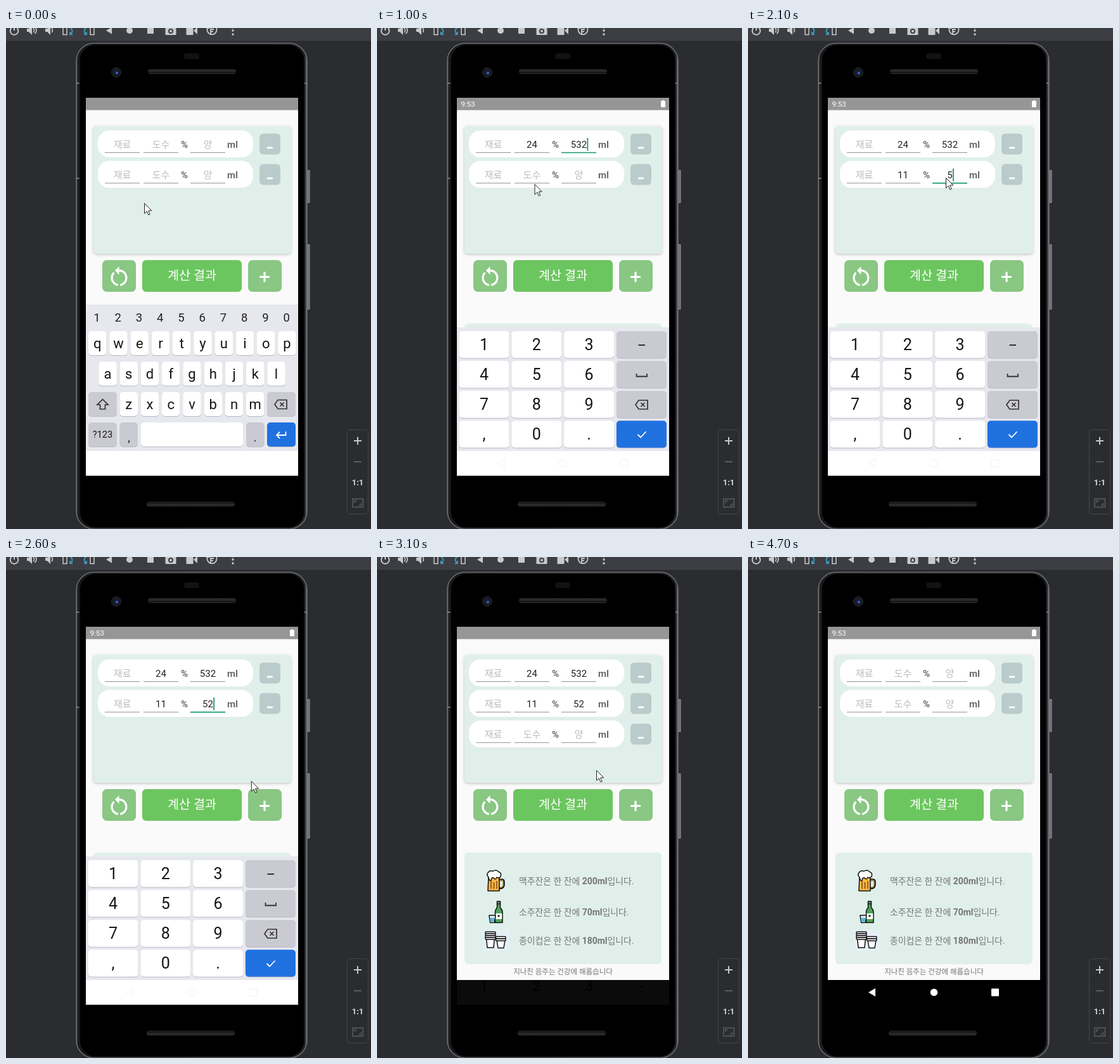
Animation, 576 px wide and 790 px high, one loop 4.8 s. Source, as an HTML page:

```html
<!DOCTYPE html>
<html lang="ko">
<head>
<meta charset="utf-8">
<title>Cocktail calculator</title>
<style>
html, body { margin: 0; width: 100%; height: 100%; overflow: hidden; background: #2b2c30; }
svg { display: block; width: 576px; height: 790px; }
text { font-family: Roboto, "Noto Sans CJK KR", "Noto Sans CJK", sans-serif; text-anchor: middle; }
</style>
</head>
<body>
<svg id="stage" viewBox="0 0 576 790">
  <defs>
    <linearGradient id="edge">
      <stop offset="0" stop-color="#55575a"/><stop offset=".008" stop-color="#17181a"/>
      <stop offset=".992" stop-color="#242527"/><stop offset="1" stop-color="#8a8c8e"/>
    </linearGradient>
    <pattern id="mesh" width="4" height="7" patternUnits="userSpaceOnUse">
      <path d="M0 1L2 3.5L0 6M2 1L4 3.5L2 6" fill="none" stroke="#4a4a4a" stroke-width=".8"/>
    </pattern>
    <filter id="soft" x="-10%" y="-10%" width="120%" height="125%">
      <feDropShadow dx="0" dy="1.5" stdDeviation="2" flood-opacity=".25"/>
    </filter>
  </defs>
  <g id="device"></g>
  <g id="app"></g>
  <g id="rows"></g>
  <g id="system"></g>
  <path id="pointer" d="M.5 .5V16.5L4.3 13L6.8 18.8L9.2 17.8L6.7 12H11.8Z" fill="#fff" stroke="#222" stroke-width="1"/>
</svg>
<script>
const LOOP = 4800, STEP = 100;
const GREEN = '#16996b', MINT = '#e0efea', INK = '#757575', BLUE = '#2071e0', GREY_KEY = '#cacad3';
const byId = id => document.getElementById(id);

const rect = (x, y, w, h, r, fill, extra = '') =>
  `<rect x="${x}" y="${y}" width="${w}" height="${h}" rx="${r}" fill="${fill}" ${extra}/>`;
const circle = (x, y, r, fill, extra = '') =>
  `<circle cx="${x}" cy="${y}" r="${r}" fill="${fill}" ${extra}/>`;
const fillPath = (d, fill, extra = '') => `<path d="${d}" fill="${fill}" ${extra}/>`;
const line = (d, color, width, extra = '') =>
  `<path d="${d}" fill="none" stroke="${color}" stroke-width="${width}" ${extra}/>`;
// y is the visual middle of the text
const label = (s, x, y, size, fill, extra = '') =>
  `<text x="${x}" y="${y + size * .355}" font-size="${size}" fill="${fill}" ${extra}>${s}</text>`;
const bold = 'font-weight="700"';
const left = 'style="text-anchor:start"';

function toolbar() {
  const c = '#c9cacd', b = '#3d9bc0';
  const speaker = x => fillPath(`M${x} 1h3l5-5v15l-5-5h-3z`, c);
  return rect(0, 0, 576, 21, 0, '#3d3e43') + rect(0, 20.5, 576, 1, 0, '#25262a') +
    line('M8.5 0A6.3 6.3 0 1 0 17.500 0M13 -3V4', c, 2) +
    speaker(33) + line('M43 0q3 4 0 7M45.500 -2q5 6 0 11', c, 1.6) +
    speaker(62) + line('M72 0q3 4 0 7', c, 1.6) +
    line('M90 -2V10.500H96V-2', c, 1.5) + line('M101 -1q5 4 3 8l-3 3M101 6v4h4', b, 1.8) +
    line('M133 -2V10.500H139V-2', c, 1.5) + line('M127 -1q-5 4 -3 8l3 3M127 6v4h-4', b, 1.8) +
    fillPath('M158 4L167-1V9.500Z', c) + circle(195, 4, 5, c) + rect(223, -1, 10, 10, 0, c) +
    rect(251.5, -2, 17, 13, 1, c) + circle(260, 5, 4, '#3d3e43') + circle(260, 5, 2, c) +
    rect(284.5, -2, 11, 13, 1, c) + fillPath('M296 4L302-1V10Z', c) +
    line('M318 0A7.500 7.500 0 1 0 332 0M316 0h5v-4M323 9V2h5M323 5.500h4', c, 1.8) +
    circle(358, 4, 1.7, c) + circle(358, 10, 1.7, c) + circle(358, -1, 1.7, c);
}

function zoomPanel() {
  return rect(538.5, 633.5, 33, 133, 4, '#2b2c30', 'stroke="#44454a"') +
    line('M549 651H561M555 645V657', '#c6c7ca', 2) + line('M549 684H561', '#606166', 1.8) +
    label('1:1', 555, 716, 13, '#d0d1d4', bold) +
    line('M547 742.500H563.500V755.500H547Z', '#5d5e63', 1.4) +
    line('M550 749V745.500H553.500M557 752.500H560.500V749', '#5d5e63', 1.3);
}

function phone() {
  const grille = (x, y) => rect(x, y, 139, 7.5, 3.5, '#151515') + rect(x, y, 139, 7.5, 3.5, 'url(#mesh)');
  const sideKey = (y, h) => rect(475.5, y, 4, h, 1, '#8b8d8f') + rect(477, y + 1, 1, h - 2, 0, '#55575a');
  return sideKey(224, 52) + sideKey(341, 103) +
    rect(111, 24, 364, 766, 28, 'url(#edge)', 'stroke="#6c6e70" stroke-width="1.5"') +
    rect(116, 26, 355, 762, 25, '#000', 'stroke="#1c1d1f" stroke-width="1.5"') +
    line('M110.500 87H115.500M110.500 237H115.500M471 87H475.500', '#77797b', 2) +
    rect(281, 40, 24, 9, 4, '#121212') + grille(224, 65) + grille(222, 747) +
    circle(174, 70, 7.5, '#18191c', 'stroke="#26272a"') + circle(174, 70, 4, '#142049') +
    circle(175, 71, 1.8, '#4f71b5');
}

function drinks() {
  const o = 'stroke="#111" stroke-width="1.5" stroke-linejoin="round"';
  const beer = line('M192 509H197Q200 509 200 512V517Q200 521 196 522H192', '#111', 3.4) +
    line('M192 509.500H197Q199 510 199 512V517Q199 520 196 521H192', '#f6ce76', 1.1) +
    fillPath('M176 504H193V526.500H175Z', '#f4b443', o) +
    line('M180 511V523M184.500 513V523M189 511V523', '#874f17', 1.6) +
    fillPath('M176 505Q172 501 175 498Q178 493 183 495.500Q188 492 192 496.500Q197 498 195 504Q192 507 189 505Q187 510 184 506Q181 504 180 510Q177 511 176 505Z', '#fff', o);
  const bottle = fillPath('M189.500 543H194.500V553Q198 556 198 560V576.500H186.500V560Q186.500 556 189.500 553Z', '#4fa35b', o) +
    line('M189 547H195', '#111', 1.2) + rect(187.2, 562, 10, 9, 0, '#fff') + circle(192, 566, 1.8, '#333') +
    fillPath('M177 565H187L185.500 576.500H178.500Z', '#d9f2fa', o) + rect(178.5, 569, 6.5, 6, 0, '#55b8dc');
  const cups = rect(168, 588, 41, 33, 0, '#e4f0f6') +
    fillPath('M172.500 600H185.500L184 616H174Z', '#fff', o) + fillPath('M189 604H202L200 616.500H191Z', '#fff', o) +
    [591, 594, 597, 600].map(y => rect(171, y, 16, 3, 1, '#fff', o)).join('') +
    [598.5, 602].map(y => rect(187.5, y, 15.5, 3.2, 1, '#fff', o)).join('');
  return beer + bottle + cups;
}

function app() {
  const fact = (name, ml, y) =>
    label(`${name} 한 잔에 <tspan ${bold}>${ml}ml</tspan>입니다.`, 224, y, 13.9, INK, left);
  const restart = 'M12 5V2L8 6l4 4V7c3.31 0 6 2.69 6 6 0 2.97-2.17 5.43-5 5.91v2.02c3.95-.49 7-3.85 7-7.93 0-4.42-3.58-8-8-8zm-6 8c0-1.65.67-3.15 1.76-4.24L6.34 7.34C4.9 8.79 4 10.79 4 13c0 4.08 3.05 7.44 7 7.93v-2.02c-2.83-.48-5-2.94-5-5.91z';
  return rect(126, 110, 335, 557, 0, '#fafafa') + rect(126, 110, 335, 19.5, 0, '#969696') +
    rect(138, 154.5, 311.5, 201, 5, MINT, 'filter="url(#soft)"') +
    rect(152, 366, 53, 50, 7, '#89c783') + rect(215, 366, 157, 50, 6, '#6cc65f') + rect(382, 366, 53, 50, 7, '#89c783') +
    fillPath(restart, '#fff', 'transform="translate(158.900 372.700) scale(1.63)"') +
    label('계산 결과', 293.5, 390.5, 19.6, '#fff') +
    line('M400 392.500H416M408 384.500V400.500', '#fff', 3.2) +
    rect(138, 466, 311, 176, 6, MINT) + drinks() +
    fact('맥주잔은', 200, 511) + fact('소주잔은', 70, 560) + fact('종이컵은', 180, 605) +
    label('지나친 음주는 건강에 해롭습니다', 293.5, 654, 11.5, INK);
}

function field(x, y, hint, value, focused) {
  const caretX = x + value.length * 4.21 + .3;
  return label(value || hint, x, y, 15, value ? '#222' : '#bdbdbd') +
    line(`M${x - 27.5} ${y + 13}h55`, focused ? GREEN : '#949494', focused ? 1.7 : 1) +
    (focused ? rect(caretX, y - 10, 1.8, 20, 0, GREEN) : '');
}

function ingredient(i, [abv, amount], focus) {
  const y = 183.5 + i * 48.1;
  return rect(145, y - 22, 245, 42.5, 18, '#fff') +
    field(183.5, y, '재료', '', false) +
    field(244.5, y, '도수', abv, focus === i + 'abv') + label('%', 281.5, y, 15, '#6c6c6c', bold) +
    field(318.5, y, '양', amount, focus === i + 'ml') + label('ml', 357.5, y, 15, '#6c6c6c', bold) +
    rect(400, y - 17, 33, 33, 6, '#b9cccb') + rect(412, y + 4, 9, 2.8, 0, '#fff');
}

function key(x, y, w, h, text = '', size = 22, fill = '#fff') {
  return rect(x, y + 1, w, h, 5, '#b9bac3') + rect(x, y, w, h, 5, fill) +
    (text ? label(text, x + w / 2, y + h / 2, size, '#151515') : '');
}

const backspace = (x, y) =>
  line(`M${x - 10} ${y}l5-7h14v14h-14zM${x - 1.5} ${y - 3}l6 6m0-6l-6 6`, '#333', 1.7);

function letterKeys() {
  const pitch = 33.25;
  const run = (s, x, y) => [...s].map((c, i) => key(x + i * pitch, y, 28.5, 38, c)).join('');
  return rect(126, 436, 335, 231, 0, '#e7e8ee') +
    [...'1234567890'].map((c, i) => label(c, 143.5 + i * pitch, 456, 18.5, '#222')).join('') +
    run('qwertyuiop', 130, 478) + run('asdfghjkl', 146.3, 526) + run('zxcvbnm', 179.5, 574) +
    key(130, 574, 45, 38, '', 0, GREY_KEY) + line('M152.500 585.500L161 594H156.500V601H148.500V594H144Z', '#333', 1.7) +
    key(412, 574, 45, 38, '', 0, GREY_KEY) + backspace(434, 593.5) +
    key(130, 622, 45, 38, '?123', 14.5, GREY_KEY) + key(179.5, 622, 28.5, 38, '', 0, GREY_KEY) + label(',', 194, 645, 19, '#222') +
    key(213, 622, 161, 38) + key(379, 622, 28.5, 38, '', 0, GREY_KEY) + label('.', 393, 645, 19, '#222') +
    key(412, 622, 45, 38, '', 0, BLUE) + line('M441.500 636.500V642H427.500M432 637L427 642L432 647', '#fff', 1.8);
}

function numberKeys() {
  const at = (c, r) => [129.5 + c * 82.8, 478 + r * 47.1, 79, 42.5];
  const digits = [...'123456789,0.'].map((c, i) => key(...at(i % 3, Math.floor(i / 3)), c, 25)).join('');
  const side = [0, 1, 2, 3].map(r => key(...at(3, r), '', 0, r < 3 ? GREY_KEY : BLUE)).join('');
  return rect(126, 472, 335, 195, 0, '#e7e8ee') + digits + side +
    line('M412.500 500H423', '#222', 1.8) + line('M409.500 545V549.500H426V545', '#333', 1.8) +
    backspace(418, 594) + line('M411.500 641L416 645.500L424.500 636.500', '#fff', 1.8);
}

const navIcons = style => fillPath('M190 686.500L201 680V693Z', '#fff', style) +
  circle(293.5, 686.5, 5.8, '#fff', style) + rect(384, 680.5, 12, 12, 1, '#fff', style);

function navBar(t) {
  if (t === 3100) {
    const ghosts = ['1', '2', '3', '-'].map((c, i) => label(c, 169 + i * 82.8, 676, 22, '#000')).join('');
    return rect(126, 667, 335, 39, 0, '#0b0b0b') + ghosts;
  }
  if (t > 3100) return rect(126, 667, 335, 39, 0, '#000') + navIcons('');
  const faint = t >= 300 && t < 2900 ? navIcons('stroke="#f1f1f1" stroke-width="1"') : '';
  return rect(126, 667, 335, 39, 0, '#fff') + faint;
}

function statusBar(t) {
  if (t < 300 || (t >= 2900 && t < 3200)) return '';
  return label('9:53', 132.5, 120.3, 11.6, '#fff', left) + rect(448, 115, 7, 10, 1, '#fff') + rect(450, 114, 3, 2, 0, '#fff');
}

// [start, row + field, end]
const focusSpans = [[200, '0abv', 500], [600, '0ml', 1000], [1100, '1abv', 1800], [1900, '1ml', 2800]];
const focusAt = t => (focusSpans.find(([a, , b]) => t >= a && t <= b) || [])[1];

const typed = (text, start, gap, t) =>
  t >= 3700 ? '' : text.slice(0, Math.max(0, Math.floor((t - start) / gap) + 1));

// [time, x, y]
const route = [
  [0, 218, 276], [200, 244, 187], [400, 244, 187], [600, 316, 187], [900, 316, 190],
  [1000, 248.5, 246], [1100, 242, 236], [1600, 243, 236], [1900, 312, 236], [2200, 312, 236],
  [2800, 413, 394], [3000, 413, 394], [3100, 346, 336], [3500, 175, 382], [3700, 175, 382], [4200, 32, 25]
];

function pointerAt(t) {
  const i = Math.max(1, route.findIndex(p => p[0] >= t));
  const [t0, x0, y0] = route[i - 1], [t1, x1, y1] = route[i];
  const k = (t - t0) / (t1 - t0), ease = k * k * (3 - 2 * k);
  return [x0 + (x1 - x0) * ease, y0 + (y1 - y0) * ease];
}

function render(t) {
  const values = [
    [typed('24', 300, 100, t), typed('532', 700, 100, t)],
    [typed('11', 1300, 200, t), typed('52', 2100, 200, t)]
  ];
  if (t >= 3000 && t < 3700) values.push(['', '']);
  byId('rows').innerHTML = values.map((v, i) => ingredient(i, v, focusAt(t))).join('');
  const keyboard = t < 200 ? letterKeys() : t < 3100 ? numberKeys() : '';
  byId('system').innerHTML = keyboard + navBar(t) + statusBar(t);
  const visible = t < 4300;
  byId('pointer').setAttribute('visibility', visible ? 'visible' : 'hidden');
  if (visible) byId('pointer').setAttribute('transform', `translate(${pointerAt(t)})`);
}

byId('device').innerHTML = toolbar() + zoomPanel() + phone();
byId('app').innerHTML = app();

let start, shown;
function tick(now) {
  start ??= now;
  const t = Math.floor((now - start) % LOOP / STEP) * STEP;
  if (t !== shown) render(shown = t);
  requestAnimationFrame(tick);
}
render(0);
requestAnimationFrame(tick);
</script>
</body>
</html>
```
